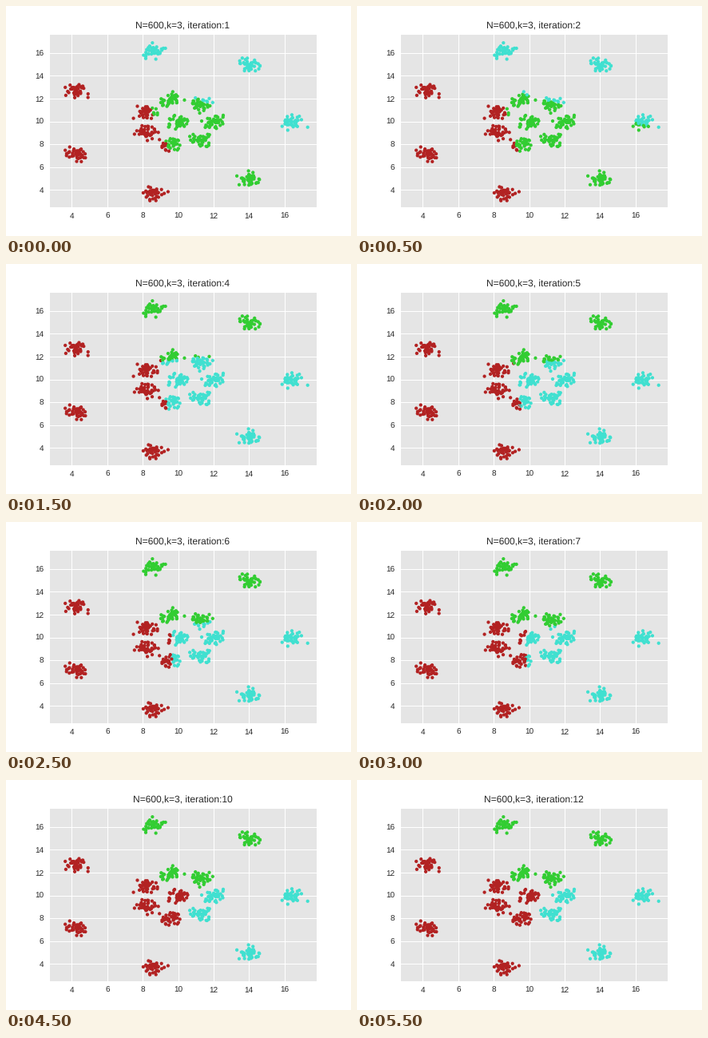
Write a matplotlib script that moves like this. It is 432 by 288 pixels and loops after 6 s.

```python
import numpy as np
import matplotlib.pyplot as plt
from matplotlib.animation import FuncAnimation

plt.rcParams.update({"font.family": "Liberation Sans", "text.hinting": "none"})

INK = "#262626"
RED, GREEN, TURQUOISE = "firebrick", "limegreen", "turquoise"
STEPS = 12
CLUSTER_SIZE = 40
SPREAD = 0.29
CENTER = np.array([10.03, 9.94])

# Key places of the left, right and top mean; they glide between iterations.
KEY_ITERATIONS = [1, 3, 4, 7, 10]
LEFT = [(7.06, 8.17), (6.7, 8.75), (6.67, 8.75), (7.04, 8.67), (7.56, 8.83)]
RIGHT = [(11.2, 9.3), (11.34, 9.2), (11.8, 9.14), (12.59, 8.63), (13.42, 8.36)]
TOP = [(13.51, 13.15), (12.45, 13.95), (11.26, 14.69), (10.84, 13.7), (10.84, 13.7)]


def ring(radius):
    """Seven cluster centers spaced evenly on a circle."""
    angles = 2 * np.pi * np.arange(7) / 7
    return CENTER + radius * np.column_stack([np.cos(angles), np.sin(angles)])


def make_points():
    rng = np.random.default_rng(15)
    centers = np.vstack([CENTER, ring(2.0), ring(6.4)])
    noise = rng.normal(size=(len(centers), CLUSTER_SIZE, 2))
    noise -= noise.mean(axis=1, keepdims=True)
    noise /= noise.std(axis=1, keepdims=True)
    return (centers[:, None] + SPREAD * noise).reshape(-1, 2)


def mean_at(iteration, path):
    return [np.interp(iteration, KEY_ITERATIONS, axis) for axis in zip(*path)]


def nearest_mean(iteration):
    means = np.array([mean_at(iteration, path) for path in (LEFT, RIGHT, TOP)])
    return ((points[:, None] - means) ** 2).sum(axis=2).argmin(axis=1)


points = make_points()

fig = plt.figure(figsize=(6, 4), dpi=72, facecolor="white")
ax = fig.add_axes([0.125, 0.125, 0.775, 0.755], facecolor="#E5E5E5")
ax.set(xlim=(2.716, 17.81), ylim=(2.486, 17.704),
       xticks=range(4, 17, 2), yticks=range(4, 17, 2))
ax.set_axisbelow(True)
ax.grid(color="white", linewidth=1)
ax.tick_params(length=0, pad=7, labelsize=10, labelcolor=INK)
for spine in ax.spines.values():
    spine.set(color="white", linewidth=1)

dots = ax.scatter(*points.T, s=18, linewidths=0)
title = ax.set_title("", fontsize=12, color=INK, pad=6)


def draw(step):
    iteration = step + 1
    # The right and top groups trade colours from the fourth iteration on.
    pair = (GREEN, TURQUOISE) if iteration < 4 else (TURQUOISE, GREEN)
    palette = (RED, *pair)
    dots.set_facecolor([palette[k] for k in nearest_mean(iteration)])
    title.set_text(f"N=600,k=3, iteration:{iteration}")
    return dots, title


anim = FuncAnimation(fig, draw, frames=STEPS, interval=500, repeat=True,
                     repeat_delay=0)
plt.show()
```
